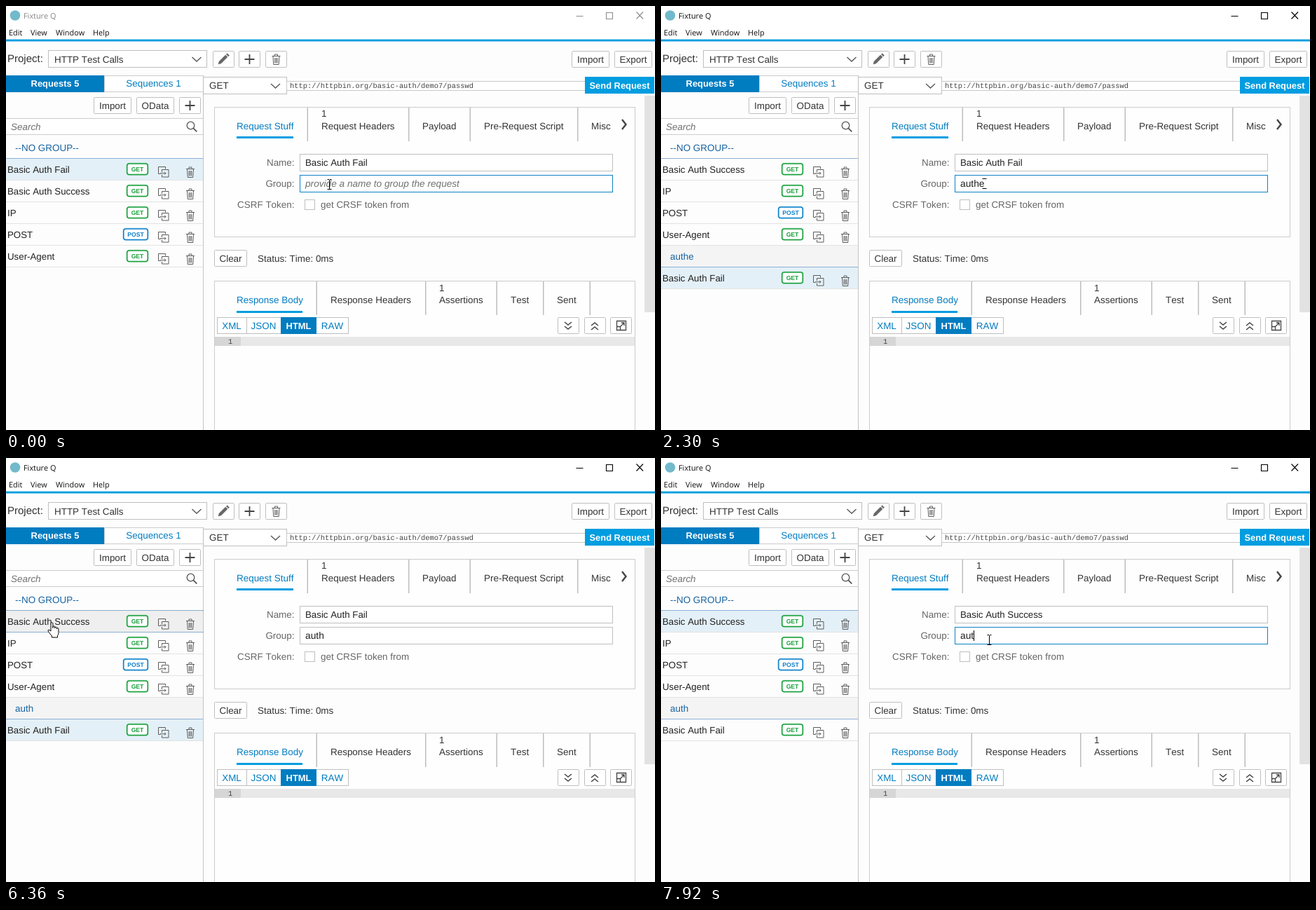
An HTML page for the animation above (8000 ms loop, 926x605 px).

```html
<!DOCTYPE html>
<html lang="en">
<head>
<meta charset="utf-8">
<title>Request editor</title>
<style>
html, body { margin: 0; width: 100%; height: 100%; overflow: hidden; background: #fdfdfd; }
svg { display: block; }
text { font-family: "Liberation Sans", Arial, sans-serif; font-size: 13.45px; font-kerning: none; fill: #333; white-space: pre; text-rendering: geometricPrecision; }
.ui { font-family: "Open Sans", "Noto Sans", sans-serif; font-size: 10.9px; fill: #111; }
.mono { font-family: "Liberation Mono", monospace; font-size: 10.4px; fill: #444; }
.blue { fill: #007cc0; }
.group { fill: #1763a1; }
.label { fill: #666; }
.hint { fill: #707070; font-style: italic; }
.bold { fill: #fff; font-weight: bold; font-size: 12.9px; }
.badge { font-size: 8.6px; font-weight: bold; }
.name { font-size: 13.3px; fill: #222; }
.typed { font-size: 13.8px; fill: #222; }
.mid { text-anchor: middle; }
.end { text-anchor: end; }
</style>
</head>
<body>
<svg width="926" height="605" viewBox="0 0 926 605">
  <g id="base"></g>
  <g id="live"></g>
</svg>
<script>
const LOOP = 8000;
const BLUE = "#007cc0", BRAND = "#009de0", EDGE = "#bfbfbf", ICON = "#5c5c5c";

const text = (s, x, y, cls = "") => `<text x="${x}" y="${y}" class="${cls}">${s}</text>`;
const fill = (x, y, w, h, c) => `<rect x="${x}" y="${y}" width="${w}" height="${h}" fill="${c}"/>`;
const box = (x, y, w, h, c = EDGE, bg = "#fff", r = 0) =>
  `<rect x="${x + .5}" y="${y + .5}" width="${w - 1}" height="${h - 1}" rx="${r}" fill="${bg}" stroke="${c}"/>`;
const path = (d, c = ICON, w = 1.2, bg = "none") => `<path d="${d}" fill="${bg}" stroke="${c}" stroke-width="${w}"/>`;
const at = (x, y, s) => `<g transform="translate(${x} ${y})">${s}</g>`;
const hline = (x, y, w, c) => fill(x, y, w, 1, c);
const button = (x, y, w, s = "") => box(x, y, w, 24, EDGE, "#fff", 1) + text(s, x + w / 2, y + 16.5, "mid");
const plus = (x, y) => path(`M${x - 7} ${y}h14M${x} ${y - 7}v14`, "#444", 1.8);
const chevron = (x, y) => path(`M${x - 6.5} ${y - 3}l6.5 6l6.5 -6`, "#555", 1.3);

const trash = (x, y) => at(x, y, path("M0 3.5h12M4 3v-2h4v2M1.5 4l.8 11.5h7.4l.8 -11.5M4.2 6v7.5M6 6v7.5M7.8 6v7.5", ICON, 1));
const copy = (x, y) => at(x, y, path("M3.5 10.5H.5V.5H10.5V3.5M5.5 8V4.5h9.5v10.5h-9.5V11.5M3 9.7h8M9 7.7l2 2l-2 2", ICON, 1));

function drawBase() {
  const menu = [["Edit", 4], ["View", 35], ["Window", 71], ["Help", 124]];
  const doubleChevron = (x, y, d) =>
    path([-5 * d, d].map(o => `M${x - 5} ${y + o}l5 ${4 * d}l5 ${-4 * d}`).join(""), "#444", 1.5);
  const tabs = (list, y) => list.map(([s, x, cls]) => text(s, x, y, cls)).join("");
  const bars = (xs, y) => xs.map(x => fill(x, y, 1.5, 48, "#bdbdbd")).join("");

  return [
    fill(0, 0, 926, 605, "#fdfdfd"),
    fill(0, 0, 926, 48, "#fff"),
    `<circle cx="13" cy="13.5" r="7.3" fill="#72b9cc"/>`,
    menu.map(([s, x]) => text(s, x, 41.5, "ui")).join(""),
    fill(0, 47.6, 926, 2.9, BRAND),

    // project bar
    `<text x="2" y="80" style="font-size:15px">Project:</text>`,
    box(60, 63, 227, 25), text("HTTP Test Calls", 69, 80.5), chevron(272, 76),
    button(295, 64, 31), button(332, 64, 31), button(370, 64, 31),
    path("M303 83l1.2 -4l9 -9l2.8 2.8l-9 9z", "#555", .5, "#666"),
    path("M314.3 69l1.4 -1.3l2.8 2.8l-1.3 1.3z", "#555", .5, "#666"),
    plus(347.5, 76), trash(379.5, 68),
    button(807, 64, 54, "Import"), button(868, 64, 54, "Export"),

    // sidebar
    box(140, 99, 142, 24, "#ccc"), fill(0, 99, 140, 24, BLUE),
    text("Requests 5", 70, 115.2, "mid bold"), text("Sequences 1", 210.5, 115.2, "mid blue"),
    button(125, 130, 54, "Import"), button(186, 130, 54, "OData"), button(247, 130, 31), plus(262.5, 142),
    fill(0, 160, 281, 24, "#fff"), hline(0, 160, 281, "#ccc"), hline(0, 183, 281, "#ccc"),
    text("Search", 7, 177, "hint"),
    `<circle cx="263.5" cy="170.5" r="5.3" fill="none" stroke="#555" stroke-width="1.3"/>`,
    path("M267.3 174.3l5 5", "#555", 1.8),
    text("--NO GROUP--", 13, 207, "group"),
    fill(281, 99, 1, 506, "#c4c4c4"),

    // address bar
    box(281, 101, 120, 25), text("GET", 290, 118), chevron(384.5, 114),
    box(400, 107, 427, 14, "#c8c8c8"),
    text("http://httpbin.org/basic-auth/demo7/passwd", 405, 116.7, "mono"),
    fill(826, 101, 99, 24, BRAND), text("Send Request", 875.5, 117.6, "mid bold"),
    fill(911, 128, 15, 309, "#e2e2e2"),

    // request panel
    box(297, 144, 601, 186, "#ccc", "#fefefe"),
    tabs([["Request Stuff", 329, "blue"], ["Request Headers", 450], ["Payload", 594],
      ["Pre-Request Script", 682], ["Misc", 835]], 175.5),
    text("1", 450, 158),
    bars([429.5, 574, 661.5, 815], 145), fill(329, 186, 81, 3, BRAND),
    path("M879 162l5.5 7l-5.5 7", "#444", 2.4),
    text("Name:", 411.5, 228, "end label"), text("Group:", 411.5, 258, "end label"),
    text("CSRF Token:", 411.5, 288, "end label"),
    box(419, 211, 447, 25),
    box(426, 276, 15, 15), text("get CRSF token from", 449, 288, "label"),
    button(297, 348, 47, "Clear"), text("Status: Time: 0ms", 359, 364.5),

    // response panel
    box(297, 392, 601, 230, "#ccc", "#fefefe"),
    tabs([["Response Body", 329, "blue"], ["Response Headers", 463], ["Assertions", 618],
      ["Test", 720], ["Sent", 786]], 424.2),
    text("1", 618, 406.5),
    bars([442.5, 598, 699.5, 766, 832.5], 393), fill(329, 435, 94, 3, BRAND),
    box(301, 444, 188, 24), fill(343, 445, 1, 22, EDGE), fill(392, 444, 51, 24, BLUE),
    text("XML", 322, 461.2, "mid blue"), text("JSON", 367.5, 461.2, "mid blue"),
    text("HTML", 417.5, 461.2, "mid bold"), text("RAW", 465.5, 461.2, "mid blue"),
    button(787, 444, 31), button(825, 444, 31), button(862, 444, 31),
    doubleChevron(802, 456, 1), doubleChevron(840, 457, -1),
    path("M871.5 449.5h13v13h-13zM871.5 457.5h5v5M876.5 457.5l5 -5M878 452h4v4", "#444", 1.3),
    fill(298, 472, 599, 13, "#e8e8e8"), fill(298, 472, 37, 13, "#d6d6d6"),
    text("1", 317, 482, "mono")
  ].join("");
}

function badge(method, x, w, top, c) {
  const outline = (width, opacity) =>
    `<rect x="${x + .8}" y="${top + 7}" width="${w - 1.6}" height="15.4" rx="3" fill="#fff" stroke="${c}" stroke-width="${width}" stroke-opacity="${opacity}"/>`;
  return outline(3, .25) + outline(1.5, 1) +
    `<text x="${x + w / 2}" y="${top + 17.8}" class="badge mid" style="fill:${c}">${method}</text>`;
}

function row(name, top, bg) {
  return fill(0, top, 281, 30, bg) + hline(0, top + 30, 281, "#e3e3e3") +
    text(name, 2, top + 20, "name") +
    (name === "POST" ? badge("POST", 167, 36, top, "#0a80cc") : badge("GET", 172, 31, top, "#16a03a")) +
    copy(217, top + 11) + trash(257, top + 11);
}

function list(s) {
  const fail = "Basic Auth Fail";
  const rest = ["Basic Auth Success", "IP", "POST", "User-Agent"];
  const bg = n => n === s.selected ? "#e4f0f7" : n === s.hover ? "#efefef" : "#fdfdfd";
  const names = s.tag ? rest : [fail, ...rest];
  let out = names.map((n, i) => row(n, 218 + 31 * i, bg(n))).join("") + hline(0, 217, 281, "#8db0d6");
  if (s.tag) {
    out += fill(0, 342, 281, 30, "#f4f4f4") + text(s.tag, 13, 362, "group") +
      row(fail, 373, bg(fail)) + hline(0, 372, 281, "#8db0d6");
  }
  if (s.dotted) {
    for (const y of [217.5, 248.5])
      out += `<path d="M0 ${y}H281" stroke="#fdfdfd"/><path d="M0 ${y}H281" stroke="#1763a1" stroke-dasharray="1 1"/>`;
  }
  return out;
}

const cursors = {
  beam: stem => path("M-2.5 .5h2.5M1 .5h2.5" + (stem ? "M.5 1v13" : "M0 .5h1") + "M-2.5 14.5h6", "#000", 1),
  arrow: () => path("M.5 .5V15.5L4 12.2L6.5 17.5L8.7 16.5L6.3 11.4H11z", "#000", 1, "#fff"),
  hand: () => path("M5 13V2.2a1.4 1.4 0 0 1 2.9 0V8.5V7.2a1.4 1.3 0 0 1 2.8 0V9V8a1.4 1.3 0 0 1 2.7 .3V10V9.2" +
    "a1.3 1.3 0 0 1 2.5 .4V15.5Q15.9 18 14.5 19.5V22H6.5V20L2 14.5Q.2 12 1.4 11.3Q2.8 10.8 5 13Z", "#000", 1, "#fff")
};

const advance = { a: .556, u: .556, t: .278, h: .556, e: .556 };
const caretX = s => Math.floor(427.4 + 13.8 * [...s].reduce((w, c) => w + advance[c], 0));

function drawLive(s) {
  const ink = s.active ? "#000" : "#8c8c8c";
  const [kind, x, y] = s.cursor;
  const cx = caretX(s.typed);
  // the beam inverts what lies below, so it cancels a caret in the same column
  const inverted = kind === "beam" && s.caret && cx === x;
  return [
    `<text x="25" y="17.5" class="ui" style="fill:${s.active ? "#111" : "#888"}">Fixture Q</text>`,
    path("M813.5 14.5h10M856.5 9.5h9v9h-9zM899.5 8.5l9.5 10M909 8.5l-9.5 10", ink, 1.1),
    list(s),
    text(s.selected, 427, 228, "name"),
    box(419, 241, 447, 25, s.focus ? "#0f82c4" : EDGE),
    s.typed ? text(s.typed, 427, 258, "typed")
      : `<text x="427" y="258" class="hint" style="font-size:13.65px">provide a name to group the request</text>`,
    s.caret && !inverted ? fill(cx, 246, 1, 15, "#000") : "",
    at(x, y, cursors[kind](!inverted))
  ].join("");
}

// each step keeps the earlier values and changes some
const steps = [
  [0, { active: false, selected: "Basic Auth Fail", hover: "", tag: "", typed: "", focus: true, caret: false, dotted: false, cursor: ["beam", 461, 247] }],
  [280, { active: true }],
  [400, { caret: true }],
  [550, { cursor: ["beam", 461, 246] }],
  [860, { caret: false }],
  [1330, { typed: "a", caret: true }],
  [1470, { typed: "au" }],
  [1590, { typed: "aut" }],
  [1870, { typed: "authe" }],
  [2300, { tag: "authe" }],
  [2890, { caret: false }],
  [3300, { typed: "auth" }],
  [3430, { caret: true }],
  [3890, { tag: "auth" }],
  [4330, { caret: false }],
  [4880, { caret: true }],
  [5000, { cursor: ["arrow", 349, 271] }],
  [5150, { cursor: ["hand", 190, 286], hover: "POST" }],
  [5300, { cursor: ["hand", 112, 316], hover: "User-Agent" }],
  [5420, { cursor: ["hand", 88, 319], caret: false }],
  [5690, { cursor: ["hand", 74, 292], hover: "POST" }],
  [5820, { cursor: ["hand", 62, 258], hover: "IP", caret: true }],
  [5940, { cursor: ["hand", 57, 225], hover: "Basic Auth Success", caret: false }],
  [6220, { cursor: ["hand", 59, 226] }],
  [6360, { cursor: ["hand", 59, 234], focus: false, dotted: true }],
  [6480, { cursor: ["hand", 68, 233], selected: "Basic Auth Success", typed: "" }],
  [6630, { cursor: ["arrow", 402, 250], hover: "", focus: true }],
  [6790, { cursor: ["beam", 458, 253] }],
  [6940, { cursor: ["beam", 464, 253] }],
  [7090, { dotted: false, caret: true }],
  [7240, { cursor: ["beam", 468, 252] }],
  [7510, { typed: "a" }],
  [7790, { typed: "au" }],
  [7920, { typed: "aut" }]
];

const states = [];
for (const [time, change] of steps)
  states.push({ ...states[states.length - 1], ...change, time });

const live = document.getElementById("live");
document.getElementById("base").innerHTML = drawBase();
let shown = null;

function tick() {
  const t = performance.now() % LOOP;
  const state = states.filter(s => s.time <= t).pop();
  if (state !== shown) live.innerHTML = drawLive(shown = state);
  requestAnimationFrame(tick);
}
tick();
</script>
</body>
</html>
```
